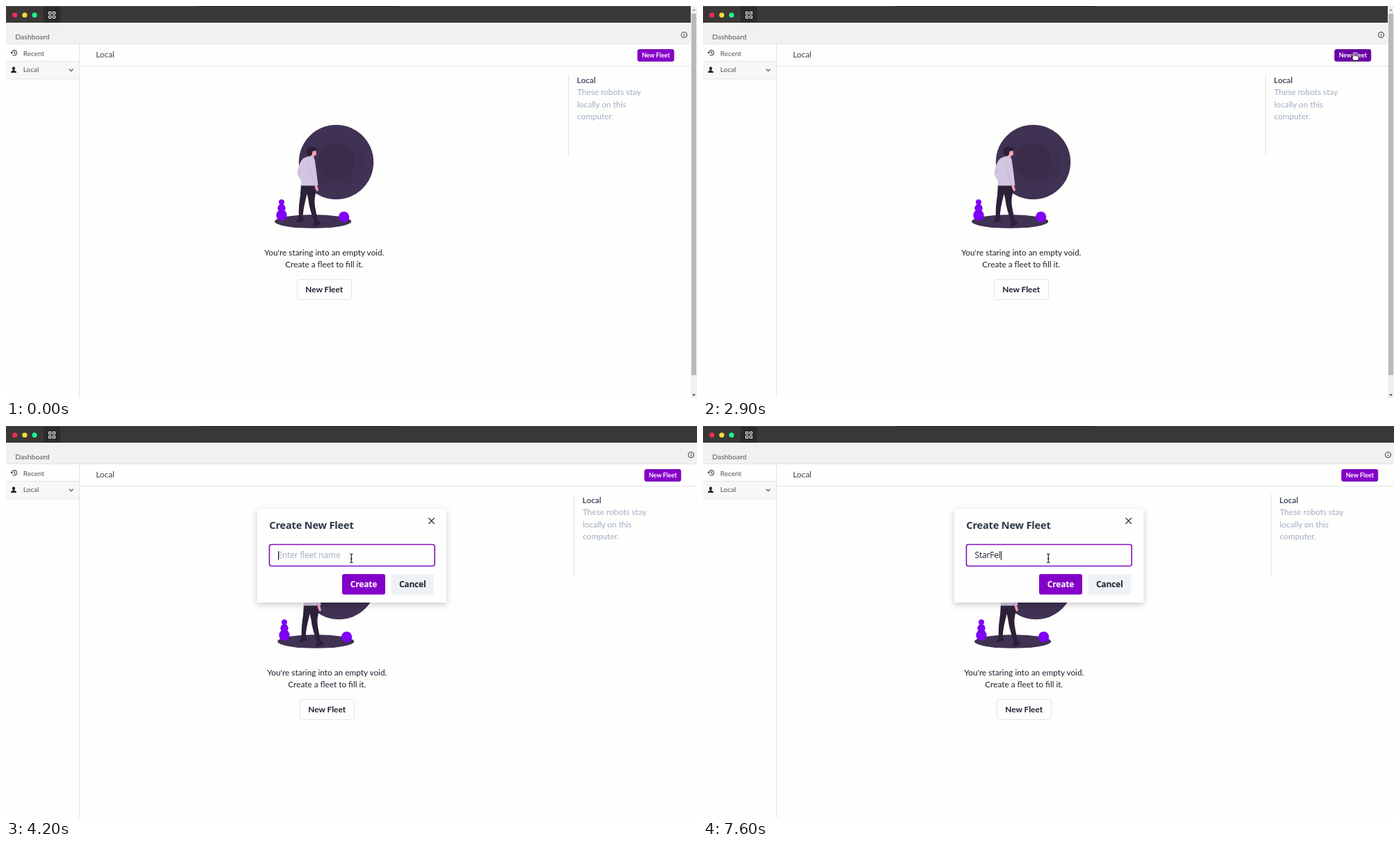
An HTML page for the animation above (8000 ms loop, 993 by 564 pixels).

```html
<!DOCTYPE html>
<html lang="en">
<head>
<meta charset="utf-8">
<title>Fleet dashboard</title>
<style>
html, body { margin: 0; width: 100%; height: 100%; overflow: hidden; background: #fefefd; }
svg { display: block; width: 993px; height: 564px; font: 11.82px Lato, sans-serif; }
text { white-space: pre; }
.mid { text-anchor: middle; }
.bold { font-weight: 700; }
.side { font-size: 10px; fill: #555; }
.muted { fill: #a0aec0; }
.dialog { font-family: "Open Sans", sans-serif; font-size: 12px; letter-spacing: -.19px; }
.line { stroke: #e4e4e4; stroke-width: 1; }
.icon { fill: none; stroke: #444; stroke-width: 1.1; }
</style>
</head>
<body>
<svg viewBox="0 0 993 564">
  <defs>
    <filter id="shadow" x="-10%" y="-15%" width="120%" height="135%">
      <feDropShadow dx="0" dy="3" stdDeviation="5" flood-color="#000" flood-opacity=".2"/>
    </filter>
  </defs>
  <rect width="993" height="564" fill="#fefefd"/>

  <!-- window bar -->
  <rect width="993" height="24" fill="#393836"/>
  <rect width="993" height="1" fill="#4b4a48"/>
  <rect x="276" width="288" height="1" fill="#2b2a29"/>
  <rect x="54" y="1" width="24" height="23" fill="#2c2b2a"/>
  <circle cx="12.7" cy="13" r="3.6" fill="#f22c55"/>
  <circle cx="26.9" cy="13" r="3.6" fill="#f5dc35"/>
  <circle cx="41" cy="13" r="3.6" fill="#1df58d"/>
  <path d="M61.5 8.5h3.3v3.3h-3.3zM67.2 8.5h3.3v3.3h-3.3zM61.5 14.2h3.3v3.3h-3.3zM67.2 14.2h3.3v3.3h-3.3z" fill="none" stroke="#fff"/>

  <!-- page header -->
  <rect y="24" width="993" height="30.5" fill="#f2f1f0"/>
  <path class="line" d="M0 54.5H993M105.5 55V564M106 86.5H993"/>
  <text x="13.3" y="47.6" font-size="10.35" fill="#555">Dashboard</text>
  <text x="129.2" y="74.4" fill="#444">Local</text>

  <!-- sidebar -->
  <rect y="79.5" width="105" height="25.5" fill="#f7f7f7"/>
  <path class="line" d="M0 79.5H105M0 105H105"/>
  <text class="side" x="24.8" y="72">Recent</text>
  <text class="side" x="24.8" y="95.4">Local</text>
  <path class="icon" d="M8.2 67.3a3.7 3.7 0 1 1 1.2 2.8M11.9 65v2.6l1.8 1"/>
  <path d="M6.2 66.6h4l-2 2.3z" fill="#444"/>
  <path d="M11 87.6a2.1 2.1 0 0 1 1.3 3.8c-.5.5-.4 1.2.3 1.6 1.6.5 2.4 1 2.4 2.9h-8c0-1.900.8-2.4 2.400-2.900.7-.4.8-1.100.3-1.600A2.100 2.100 0 0 1 11 87.600z" fill="#222"/>
  <path class="icon" d="M90.700 90.600l3 3 3-3" stroke-width="1.300"/>

  <!-- info and header button -->
  <g id="right">
    <circle class="icon" cx="974.500" cy="41.500" r="4" stroke-width=".9"/>
    <path class="icon" d="M974.500 41v2.600M974.500 39.200v1"/>
    <rect id="add" x="907.800" y="62.500" width="52" height="17" rx="2.500" stroke="#6500a0" stroke-width=".8"/>
    <text class="mid bold" x="933.800" y="74" font-size="8.870" fill="#fff">New Fleet</text>
  </g>

  <g id="aside">
    <path class="line" d="M808.500 98V216"/>
    <text class="bold" x="820.300" y="110.600" fill="#4a5568">Local</text>
    <text class="muted" x="820.700" y="128.200">These robots stay</text>
    <text class="muted" x="820.700" y="145.700">locally on this</text>
    <text class="muted" x="820.700" y="163.200">computer.</text>
  </g>

  <!-- empty state -->
  <g id="empty">
    <circle cx="474.500" cy="224.600" r="53.700" fill="#403253"/>
    <circle cx="474.500" cy="224.600" r="40" fill="#3e3050"/>
    <circle cx="474.500" cy="224.600" r="26.300" fill="#392c49"/>
    <ellipse cx="441.200" cy="310" rx="55" ry="9.800" fill="#403253"/>
    <g fill="#8000f8">
      <circle cx="396" cy="301" r="7.700"/><circle cx="396" cy="291" r="5.700"/>
      <circle cx="396" cy="282.200" r="4"/><circle cx="485.600" cy="303.400" r="7.700"/>
    </g>
    <path d="M390.500 295.800q5.500 2 11 0M391.800 287q4.200-1.800 8.400 0" fill="none" stroke="#5f10b5" stroke-width=".8"/>
    <g fill="#2c2138">
      <path d="M424 256L444.500 256C447 264 444.500 271 443.500 278 443 288 446.500 299 448 309L442.500 310C439 299 435.500 289 434.500 279L432.500 270C431 279 427.500 287 426.500 305L421 305C420 293 421.500 282 423 272z"/>
      <path d="M421 304l5.500 0 2 2.500q0 2-3 2.800-2.500 1.800-5 2-3-.5-2.500-2.500z"/>
      <path d="M442.500 308l5.500 0q3 2.500 4.500 5 -1 3-4.500 3.500-3 1.800-5.500 1.300-2-.8-1-2.800 1.500-3 1-7z"/>
    </g>
    <path d="M434 213l8 1 1 7-8 0zM439 206q6-1 6.500 3.500l.7 4q-2 2.800-5.500 2.500l-3-4zM443.500 258l3.500-.5 2 7.500-2 2-2.500-4z" fill="#f9a3b2"/>
    <path d="M431.800 212c-2-6 3-10.500 8.200-9.500 2 .3 3 1.300 4.500 1.300 2 .2 2.700 2.600 1.300 4.300l-5.300.900-.7 4.500-3 3.200c-2.500-.2-4-2-5-4.700z" fill="#2c2138"/>
    <path d="M435 216.500c-5 .8-9 3-11.500 7.500-2.500 5-4.600 11-4.600 17.500 0 3.500 4.200 8 5.100 10l0 7 20.700 0 3.800-.8c-1.500-10-2-19-3.500-26.500-.5-5-1-10-2.500-12.500-2-2.700-4.500-2.700-7.500-2.200z" fill="#d1c5df"/>
    <path d="M434.500 226c2 8 3 15 5.500 21l4 11M419.500 242l4.500-7" fill="none" stroke="#b9abc9" stroke-width=".7"/>
    <g class="mid" fill="#1a202c">
      <text x="457.300" y="358.700">You're staring into an empty void.</text>
      <text x="457.300" y="376.200">Create a fleet to fill it.</text>
      <rect x="418.500" y="393.500" width="78" height="29" rx="3" fill="#fefefe" stroke="#e2e4e8"/>
      <text class="bold" x="457.200" y="411.700">New Fleet</text>
    </g>
  </g>

  <g id="scroll">
    <rect x="984" width="9" height="564" fill="#f1f1f1"/>
    <rect x="985" y="11" width="7" height="520" fill="#b9b9b9"/>
    <path d="M986 7l2.500-3 2.500 3z" fill="#a3a3a3"/>
    <path d="M986 558.500l2.500 3 2.500-3z" fill="#505050"/>
  </g>

  <g id="modal" class="dialog" fill="#1a202c">
    <rect x="361" y="119" width="272" height="135" rx="3" fill="#fefefe" filter="url(#shadow)"/>
    <text class="bold" x="378.300" y="147.600" font-size="14.600" style="font-size:14.6px" fill="#2d3748">Create New Fleet</text>
    <path class="icon" d="M607.300 132.300l8.400 8.400m0-8.400l-8.400 8.400" style="stroke:#2d3748;stroke-width:1.3"/>
    <rect x="378.500" y="170.500" width="237.500" height="31" rx="3" fill="#fefefe" stroke="#8110bd" stroke-width="1.600"/>
    <text id="hint" class="muted" x="390.600" y="189.900">Enter fleet name</text>
    <text id="name" x="390.600" y="189.900"></text>
    <rect id="caret" y="180" width="1" height="13" fill="#111"/>
    <rect x="483" y="213" width="62" height="29.500" rx="3" fill="#8400c8"/>
    <text class="mid bold" x="514" y="232.200" fill="#fff">Create</text>
    <rect x="553.500" y="213" width="61.500" height="29.500" rx="3" fill="#edf2f7"/>
    <text class="mid bold" x="584.200" y="232.200">Cancel</text>
  </g>

  <g id="arrow" stroke="#111" fill="#fff" stroke-width=".9">
    <path d="M.5.500v10.800l2.500-2.300 1.700 4 1.900-.8-1.700-3.900h3.500z"/>
  </g>
  <g id="hand" stroke="#111" fill="#fff" stroke-width=".9" stroke-linejoin="round">
    <path d="M.6 1.400q.8-1.300 1.700-.200l1.400 3.600 1-.6 1.300.3 1-.3 1.300.6 1.200 0 .9 1.300.3 3.200-1 2-6 .2-2.800-3.500q.2-1.500 1.600-.8z"/>
  </g>
  <path id="beam" d="M-2.300-6.300q1.800 0 2.300 1 .5-1 2.300-1M0-5.300v10.600M-2.300 6.300q1.800 0 2.300-1 .5 1 2.300 1M-1.300.9h2.600" fill="none" stroke="#222" stroke-width="1.200"/>
</svg>
<script>
const LOOP = 8000, STEP = 100, OPEN = 3000;
const $ = id => document.getElementById(id);
const [right, add, aside, empty, scroll, modal, hint, name, caret] =
  ["right", "add", "aside", "empty", "scroll", "modal", "hint", "name", "caret"].map($);
const pointers = ["arrow", "hand", "beam"].map(id => [id, $(id)]);

// pointer stops: time, x, y
const path = [
  [800, 86, 46], [900, 296, 202], [1100, 296, 202], [1400, 669, 159],
  [1600, 669, 159], [1700, 792, 108], [1800, 792, 108], [1900, 953, 79],
  [2100, 953, 79], [2200, 953.5, 79], [2500, 931.5, 67], [2900, 931.5, 67],
  [3000, 932, 69], [3300, 932, 69], [3900, 530, 177],
  [4000, 530, 177], [4200, 496.3, 190.3]
];
const typed = [[5900, "S"], [6100, "t"], [6200, "a"], [6500, "r"], [7200, "F"], [7400, "e"], [7600, "l"]];
const caretOff = [[3600, 4100], [4700, 5300], [6900, 7200]];

const shift = (el, x, y = 0) => el.setAttribute("transform", `translate(${x} ${y})`);
const show = (el, on) => el.setAttribute("visibility", on ? "visible" : "hidden");

function pointAt(t) {
  const i = path.findIndex(p => p[0] > t);
  if (i < 0) return path[path.length - 1].slice(1);
  const [t0, x0, y0] = path[i - 1], [t1, x1, y1] = path[i];
  const k = (t - t0) / (t1 - t0);
  return [x0 + (x1 - x0) * k, y0 + (y1 - y0) * k];
}

function buttonColor(t) {
  if (t >= OPEN || t < 2200) return "#8600ca";
  return t < 2800 ? "#8000c6" : t < 2900 ? "#7500b7" : "#6a00a6";
}

function draw(time) {
  const t = Math.floor(time / STEP) * STEP;
  const open = t >= OPEN;
  shift(right, open ? 10 : 0);
  shift(aside, open ? 8 : 0);
  shift(empty, open ? 4 : 0);
  add.setAttribute("fill", buttonColor(t));
  show(scroll, !open);
  modal.setAttribute("opacity", open ? (t < OPEN + STEP ? 0.6 : 1) : 0);

  const word = typed.filter(k => k[0] <= t).map(k => k[1]).join("");
  name.textContent = word;
  hint.setAttribute("opacity", word ? 0 : 1);
  caret.setAttribute("x", Math.round(390.6 + (word ? name.getComputedTextLength() : 0)));
  caret.setAttribute("opacity", caretOff.some(([a, b]) => t >= a && t < b) ? 0 : 1);

  const kind = t < 800 ? "" : t >= 3900 ? "beam" : t >= 1900 && t < OPEN ? "hand" : "arrow";
  for (const [id, el] of pointers) {
    show(el, id === kind);
    if (id === kind) shift(el, ...pointAt(t));
  }
}

function tick() {
  draw(performance.now() % LOOP);
  requestAnimationFrame(tick);
}
tick();
</script>
</body>
</html>
```
